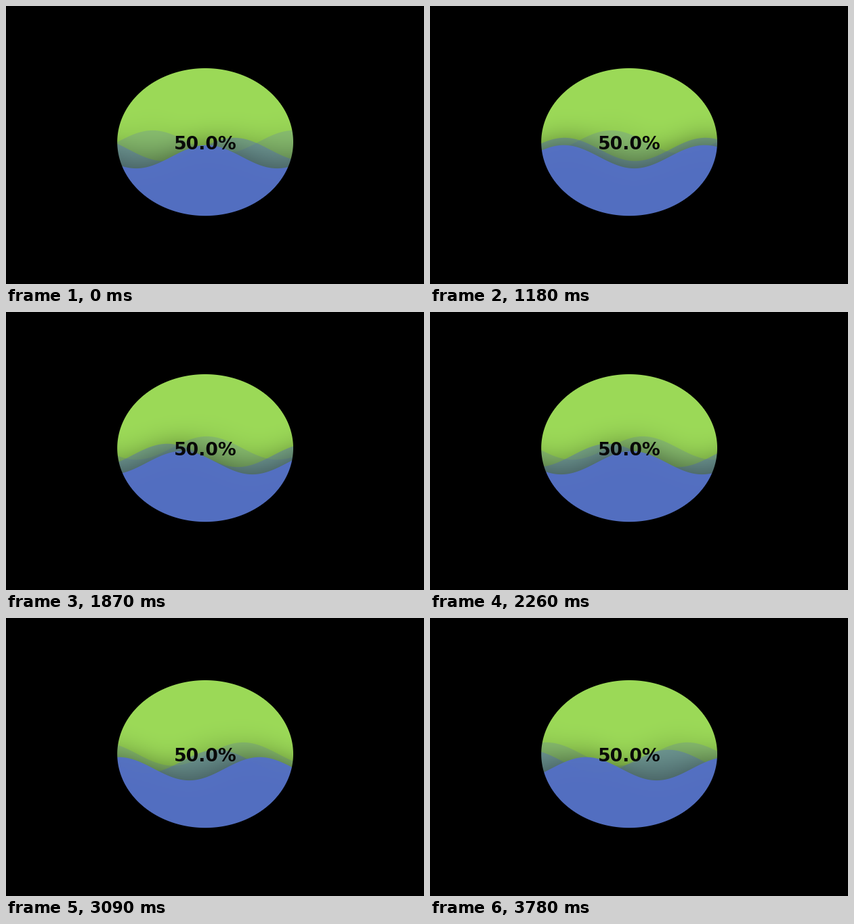
A matplotlib script for the animation above (3880 ms loop, 617 px wide and 411 px high).

```python
import numpy as np
import matplotlib.pyplot as plt
from matplotlib.animation import FuncAnimation

W, H, DPI = 617, 411, 64
LOOP, TICK, POSES = 3880, 10, 28

# ellipse and palette
CX, CY, RX, RY = 294.1, 201.1, 129.9, 109.1
GREEN = np.array([156, 218, 88]) / 255
BLUE = np.array([84, 112, 198]) / 255

# three waves, back to front: each lies lower and runs faster
LENGTH, AMP, DROP = 208, 17.2, 10.9
CRESTS = (216.5, 337, 296.2)
OPACITY = (0.22, 0.42, 0.95)
SLOWEST = 4811
SHADOW, SIGMA = 0.4, 21
SOFT = np.exp(-((2 * np.pi * SIGMA / LENGTH) ** 2) / 2)

X, Y = np.meshgrid(np.arange(W) + 0.5, np.arange(H) + 0.5)


def step_times():
    """Pose start times: an uneven pace given by a few key points."""
    keys = [0, 7, 8, 16, 18, 20, 23, 25, 27]
    times = [0, 1060, 1180, 2260, 2550, 2790, 3240, 3480, 3780]
    return np.interp(np.arange(POSES), keys, times) // TICK * TICK


def ellipse_mask():
    u, v = (X - CX) / RX, (Y - CY) / RY
    r = np.hypot(u, v)
    slope = np.hypot(u / RX, v / RY) / np.maximum(r, 1e-6)
    return np.clip((1 - r) / np.maximum(slope, 1e-6) + 0.5, 0, 1)


def normal_cdf(z):
    z = np.clip(z, -6, 6)
    return 0.5 * (1 + np.tanh(0.79788 * (z + 0.044715 * z ** 3)))


def paint(t):
    img = np.ones((H, W, 3)) * GREEN
    for i, (crest, alpha) in enumerate(zip(CRESTS, OPACITY)):
        period = SLOWEST * (0.2 + 0.8 * (3 - i) / 3)
        depth = Y - CY - DROP * i
        swell = AMP * np.cos(2 * np.pi * ((X - crest) / LENGTH - t / period))
        # blurred shadow first, then the wave itself
        shade = SHADOW * alpha * normal_cdf((depth + SOFT * swell) / SIGMA)
        cover = alpha * np.clip(depth + swell + 0.5, 0, 1)[..., None]
        img = img * (1 - shade[..., None]) * (1 - cover) + BLUE * cover
    return img * MASK


MASK = ellipse_mask()[..., None]
steps = step_times()
poses = [paint(t) for t in steps]

fig = plt.figure(figsize=(W / DPI, H / DPI), dpi=DPI, facecolor="black")
ax = fig.add_axes([0, 0, 1, 1])
ax.set_axis_off()
picture = ax.imshow(poses[0], extent=(0, W, H, 0), aspect="auto",
                    interpolation="nearest")
ax.text(CX, 211.6, "50.0%", ha="center", va="baseline", color="#080808",
        family="DejaVu Sans", weight="bold", size=26.7 * 72 / DPI)


def update(i):
    k = np.searchsorted(steps, i * TICK, side="right") - 1
    picture.set_data(poses[k])
    return picture,


anim = FuncAnimation(fig, update, frames=LOOP // TICK, interval=TICK,
                     repeat=True, repeat_delay=0)
plt.show()
```
